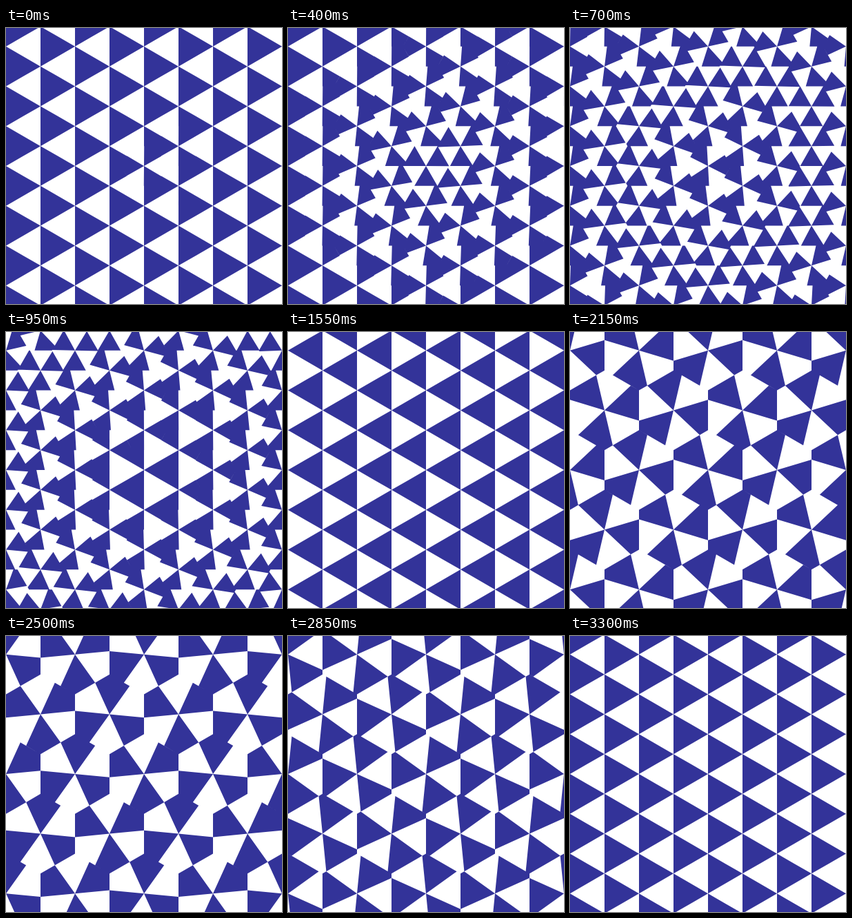
These frames come from a looping animation (400x400 px, 3350 ms). An HTML page:

```html
<!DOCTYPE html>
<html lang="en">
<head>
<meta charset="utf-8">
<title>Turning triangles</title>
<style>
  html, body { margin: 0; width: 100%; height: 100%; overflow: hidden; background: #fff; }
  svg { display: block; width: 100%; height: 100%; }
</style>
</head>
<body>
<svg viewBox="0 0 400 400"><path id="blades" fill="#333399"/></svg>
<script>
const CENTER = 200;
const SIDE = 100 / Math.sqrt(3);
const STEP = 50;
const FRAMES = 67;
const HALF = FRAMES / 2;
const LEAD = 1.9;
const SPREAD = 0.7;
const RINGS = 5;

const blades = document.getElementById('blades');
const rad = deg => deg * Math.PI / 180;
const clamp = v => Math.min(1, Math.max(0, v));
const ease = u => u * u * u * (u * (6 * u - 15) + 10);

// Every vertex, walked outwards in hexagonal rings, clockwise from the top;
// delay grows steadily from 0 to 1 along this spiral
function spiral() {
  const points = [{ x: CENTER, y: CENTER, delay: 0 }];
  for (let ring = 1; ring <= RINGS; ring++) {
    let x = CENTER;
    let y = CENTER - ring * SIDE;
    for (let k = 1; k <= 6 * ring; k++) {
      const heading = rad(30 + 60 * Math.floor((k - 1) / ring));
      x += SIDE * Math.cos(heading);
      y += SIDE * Math.sin(heading);
      points.push({ x, y, delay: (ring - 1 + k / (6 * ring)) / RINGS });
    }
  }
  return points;
}

// Every third vertex; diagonal rows turn in alternate directions
function diagonals() {
  const points = [];
  for (let row = -3; row <= 3; row++) {
    for (let col = -5; col <= 5; col++) {
      points.push({
        x: CENTER + 100 * col + 50 * row,
        y: CENTER + 1.5 * SIDE * row,
        spin: (col + row) % 2 ? 1 : -1
      });
    }
  }
  return points;
}

// normal: direction of a hexagon side; start: first edge of a blue sector
const small = { points: spiral(), inradius: SIDE / 2, normal: 30, start: 30 };
const large = { points: diagonals(), inradius: 50, normal: 0, start: -30 };

// Three blue sectors of a pinwheel, cut off by its fixed hexagon
function pinwheel({ x, y }, { inradius, normal, start }, turn) {
  const rim = deg => {
    const offset = deg - normal - 60 * Math.round((deg - normal) / 60);
    const r = inradius / Math.cos(rad(offset));
    return `${(x + r * Math.cos(rad(deg))).toFixed(3)} ${(y + r * Math.sin(rad(deg))).toFixed(3)}`;
  };
  let d = '';
  for (let k = 0; k < 3; k++) {
    const from = start + turn + 120 * k;
    const corner = normal + 30 + 60 * Math.ceil((from - normal - 30) / 60);
    d += `M${x.toFixed(3)} ${y.toFixed(3)}L${rim(from)}L${rim(corner)}L${rim(from + 60)}Z`;
  }
  return d;
}

function draw(ms) {
  const frame = Math.floor(ms / STEP) % FRAMES;
  const phase = ((frame + LEAD) / HALF) % 2;
  const rippling = phase < 1;
  const grid = rippling ? small : large;
  const turnAt = rippling
    ? p => 60 * ease(clamp(phase * (1 + SPREAD) - SPREAD * p.delay))
    : p => 60 * p.spin * ease(phase - 1);
  blades.setAttribute('d', grid.points.map(p => pinwheel(p, grid, turnAt(p))).join(''));
}

const begin = performance.now();
function tick() {
  draw(performance.now() - begin);
  requestAnimationFrame(tick);
}
tick();
</script>
</body>
</html>
```
